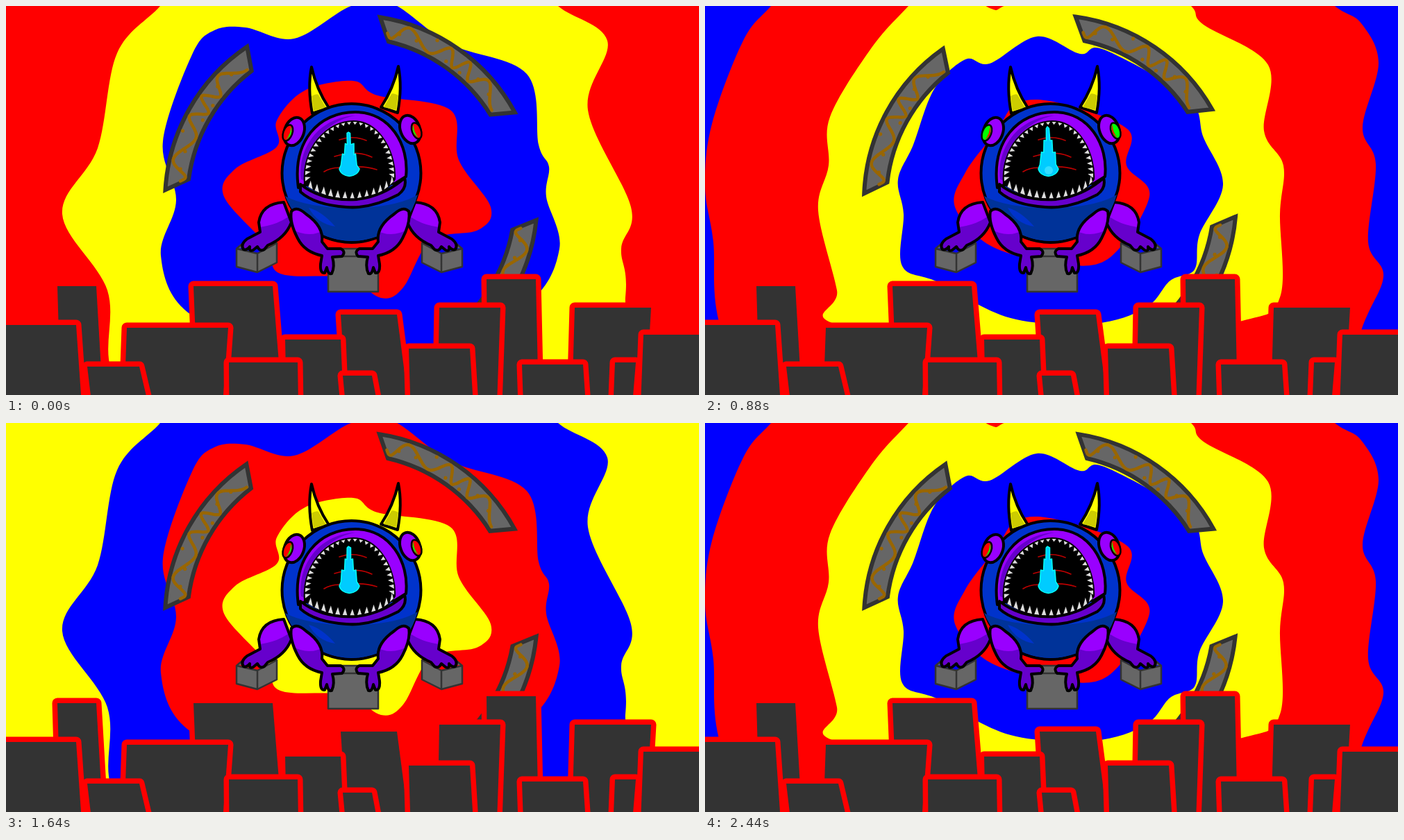
An HTML page that plays this animation: 998 px wide and 561 px high, repeating every 2.48 s.

```html
<!DOCTYPE html>
<html lang="en">
<head>
<meta charset="utf-8">
<title>City monster</title>
<style>
html, body { margin: 0; width: 100%; height: 100%; overflow: hidden; background: #000; }
svg { display: block; width: 998px; height: 561px; }
.ink { stroke: #000; stroke-width: 4; stroke-linejoin: round; }
.line { fill: none; stroke-linecap: round; stroke-linejoin: round; }
.block { fill: #666; stroke: #333; stroke-width: 2.5; stroke-linejoin: round; }
.rune { stroke: #0d0; stroke-width: 2; opacity: var(--rune); }
.house { fill: #333; stroke: #f00; stroke-width: 15; stroke-linejoin: round; paint-order: stroke; }
.lamp { fill: #ff0; fill-opacity: var(--lamp); }
</style>
</head>
<body>
<svg id="stage" viewBox="0 0 998 561">
  <rect id="sky" width="998" height="561"/>
  <g id="rings"></g>
  <g id="orbit"></g>

  <path class="block" d="M464 361L475 350H525L536 361V412H464ZH536"/>
  <g id="runes" class="line rune"></g>
  <g id="back">
    <path class="block" d="M332 350L346 338L390 342V370L362 384L332 376ZL362 357L390 342M362 357V384"/>
    <path class="line rune" d="M340 358V374M340 366L352 368M352 362V376M370 360V374M380 356V368"/>
  </g>
  <use href="#back" transform="matrix(-1 0 0 1 989 0)"/>

  <g class="ink">
    <g id="horn">
      <path fill="#ff0" d="M440 88Q434 118 441 155L465 147Q447 120 440 88Z"/>
      <path fill="#cc0" stroke="none" d="M440 130Q447 126 450 128L461 147L443 151Z"/>
    </g>
    <use href="#horn" transform="matrix(-1 0 0 1 1005 -1)"/>
    <circle cx="497.500" cy="241" r="100" fill="#03c"/>
    <path stroke="none" fill="#039" d="M402 274Q430 290 497 292Q565 290 593 272Q580 318 545 328Q497 350 450 327Q415 308 402 274Z"/>
    <path stroke="none" fill="#03c" d="M436 291Q455 296 474 318Q448 314 436 291Z"/>
    <g id="eye">
      <g transform="rotate(20 415 181)">
        <ellipse cx="415" cy="181" rx="14" ry="21" fill="#90f"/>
        <ellipse cx="407" cy="186" rx="6.500" ry="12" fill="var(--eye)" stroke-width="2.500"/>
        <path stroke="none" fill="var(--slit)" d="M408 176Q416 186 408 196Q412 186 408 176Z"/>
      </g>
    </g>
    <use href="#eye" transform="matrix(-1 0 0 1 997 -3)"/>
    <path fill="#90f" d="M421 262C412 195 450 153 503 153C553 153 581 200 576 246L560 256L430 258Z"/>
    <path stroke="none" fill="#60c" d="M425 250C420 200 455 160 503 158C460 166 428 204 430 252Z"/>
    <path stroke-width="2" d="M430 256C426 205 462 166 500 166C540 166 562 215 560 250Q540 278 500 280Q455 277 430 256Z"/>
  </g>
  <path class="line" stroke="#b00" stroke-width="1.600" d="M480 193Q500 186 519 194M473 217Q505 207 527 218M458 239Q470 231 490 234Q510 229 534 236"/>
  <g id="teeth" fill="#ddd"></g>
  <path class="ink" fill="#60c" d="M424 257Q455 282 505 279Q545 274 574 248Q578 262 565 272Q525 293 490 290Q445 287 424 268Z"/>
  <path id="flame" fill="#0cf" stroke="#0ff" stroke-width="1.500" stroke-linejoin="round"/>
  <circle id="glow" cx="495" cy="237" r="6" fill="#3df"/>
  <g id="front"></g>
  <use href="#front" transform="matrix(-1 0 0 1 991 0)"/>
  <g id="city"></g>
  <g id="bolts" fill="none" stroke="#0ff" stroke-width="12"></g>
</svg>

<script>
const TICK = 40, TICKS = 62, CYCLE = 20;
const $ = id => document.getElementById(id);

function add(parent, tag, attrs) {
  const el = document.createElementNS('http://www.w3.org/2000/svg', tag);
  for (const key in attrs) el.setAttribute(key, attrs[key]);
  return parent.appendChild(el);
}

// Catmull-Rom spline through points written as "x,y x,y ..."
function smooth(text, closed) {
  const p = text.split(' ').map(s => s.split(',').map(Number));
  const n = p.length;
  const at = i => closed ? p[(i + n) % n] : p[Math.max(0, Math.min(n - 1, i))];
  let d = 'M' + p[0];
  for (let i = 0; i < (closed ? n : n - 1); i++) {
    const [a, b, c, e] = [at(i - 1), at(i), at(i + 1), at(i + 2)];
    d += `C${b.map((v, k) => v + (c[k] - a[k]) / 6)} ${c.map((v, k) => v - (e[k] - b[k]) / 6)} ${c}`;
  }
  return d;
}

function random(seed) {
  return () => (seed = seed * 16807 % 2147483647) / 2147483647;
}

// Background: two alternating sets of blobs, outermost first
const ringSets = [
  [
    '222,0 160,68 132,205 81,300 146,410 150,520 200,620 860,620 892,420 886,350 900,290 838,150 866,50 795,0 740,-60 270,-60',
    '300,35 345,31 415,47 497,0 555,-4 640,55 750,98 767,200 782,232 778,275 797,350 750,430 600,500 400,500 262,442 223,360 245,280 226,195 268,70',
    '390,165 430,122 500,108 535,129 640,150 652,222 698,290 680,323 612,338 572,406 540,421 490,392 395,386 375,345 314,275 330,235 390,203'
  ], [
    '95,0 55,50 10,170 0,260 12,340 20,455 80,620 900,620 945,468 977,390 955,340 966,228 947,175 970,82 945,25 907,0 840,-60 150,-60',
    '293,0 240,60 180,160 178,230 163,295 190,410 192,460 500,505 770,455 828,420 828,300 833,230 805,180 811,85 718,27 700,0 640,-50 450,-6 410,3 340,-50',
    '478,44 540,69 575,63 695,132 718,190 746,258 712,330 705,380 670,396 635,435 560,458 440,450 335,398 284,375 286,300 278,250 300,200 330,120 375,77 410,83',
    '450,140 510,140 609,178 607,230 640,275 580,365 500,370 410,345 360,290 375,240 420,180'
  ]
];
const ringGroups = ringSets.map(set => {
  const g = add($('rings'), 'g', {});
  set.forEach(s => add(g, 'path', { d: smooth(s, true) }));
  return g;
});

// Orbiting stone arcs, each with a wavy vine and dots
const CX = 497, CY = 281, HUB = `${CX} ${CY}`;
function polar(deg, r) {
  const a = deg * Math.PI / 180;
  return `${CX + r * Math.sin(a)},${CY - r * Math.cos(a)}`;
}
const wave = a => 11 * Math.sin(a * 0.62 + 1.5 * Math.sin(a * 0.2));
const slab = `M${polar(0.8, 268)}A268 268 0 0 1 ${polar(53.4, 268)}L${polar(50, 236)}A236 236 0 0 0 ${polar(5, 236)}Z`;
const vine = Array.from({ length: 46 }, (_, i) => polar(4 + i, 252 + wave(4 + i))).join(' ');
for (const turn of [0, 87, 175, -95.6]) {
  const g = add($('orbit'), 'g', { transform: `rotate(${turn} ${HUB})` });
  add(g, 'path', { d: slab, fill: '#666', stroke: '#333', 'stroke-width': 6 });
  add(g, 'path', { d: smooth(vine), class: 'line', stroke: 'var(--vine)', 'stroke-width': 4.5 });
  for (let a = 8; a < 50; a += 6) {
    const [cx, cy] = polar(a, 252 - wave(a)).split(',');
    add(g, 'circle', { cx, cy, r: 2.6, fill: 'var(--vine)' });
  }
}

// Scribbles on the middle block
const scribble = random(11);
for (let i = 0; i < 13; i++) {
  const spot = () => `${468 + 64 * scribble()} ${364 + 45 * scribble()}`;
  add($('runes'), 'path', { d: `M${spot()}Q${spot()} ${spot()}` });
}

// Left legs; the right ones are mirrored
function leg(parent, name, d, shade) {
  const clip = add(parent, 'clipPath', { id: name });
  add(clip, 'path', { d });
  add(parent, 'path', { d, fill: '#90f' });
  add(parent, 'path', { d: shade, fill: '#60c', 'clip-path': `url(#${name})` });
  add(parent, 'path', { d, fill: 'none', class: 'ink' });
}
leg($('back'), 'hind', 'M400 283Q368 285 364 312L366 326L347 336Q337 344 342 351Q346 353 351 347Q350 355 356 352L362 347Q366 355 372 351L377 345Q402 335 411 312Z', 'M340 320Q385 322 412 300V360H335Z');
leg($('front'), 'fore', 'M411 296Q419 288 432 300Q458 318 455 340L463 350L482 350Q490 354 484 361L470 362Q474 376 469 386Q464 388 462 377L459 385Q452 386 453 372L455 360Q430 355 420 335Q408 312 411 296Z', 'M405 318Q435 338 460 322L500 345V395H440Z');

// Teeth along a curve
function teeth(d, count, size, tip) {
  const curve = add($('teeth'), 'path', { d, fill: 'none' });
  const total = curve.getTotalLength();
  for (let i = 0; i < count; i++) {
    const at = k => curve.getPointAtLength(total * (i + k) / count);
    const a = at(0.15), b = at(0.5), c = at(0.85);
    const [tx, ty] = tip(b), k = size(i / count) / Math.hypot(tx - b.x, ty - b.y);
    add($('teeth'), 'path', { d: `M${a.x} ${a.y}L${b.x + (tx - b.x) * k} ${b.y + (ty - b.y) * k}L${c.x} ${c.y}Z` });
  }
}
teeth('M431 254C427 206 462 167 500 167C540 167 561 215 559 249', 27, u => 4 + 9 * Math.abs(u - 0.5), () => [497, 225]);
teeth('M434 260Q460 277 500 279Q538 276 559 252', 13, () => 11, p => [p.x + 2, 200]);

// Houses, back to front: x, y, width, lean
const houses = [
  [74, 404, 56, 10], [270, 404, 114, 14], [692, 394, 71, 4], [482, 445, 81, 17], [624, 435, 88, -5], [819, 435, 110, -8],
  [-20, 460, 121, 8], [174, 464, 146, -8], [402, 481, 80, 4], [580, 494, 88, 5], [117, 520, 75, 13],
  [321, 514, 99, 1], [485, 533, 42, 8], [743, 517, 88, 4], [877, 514, 30, -5], [918, 474, 110, -8]
];
const rand = random(7);
for (const [x, y, w, lean] of houses) {
  const end = 575;
  add($('city'), 'path', { class: 'house', d: `M${x} ${y}H${x + w}L${x + w + lean} ${end}H${x + lean / 2}Z` });
  for (let row = y + 16; row < end; row += 17)
    for (let col = x + 14; col < x + w - 6; col += 17) {
      if (rand() < 0.12) continue;
      const cx = col + lean * (row - y) / (end - y) + rand() * 4 - 2, cy = row + rand() * 3 - 1.5;
      add($('city'), 'ellipse', { class: 'lamp', cx, cy, rx: 5.5 + rand(), ry: 3.5, transform: `rotate(${-10 * rand()} ${cx} ${cy})` });
    }
}

const bolts = [
  '628,0 615,35 616,58 630,72', '626,102 628,130 631,165 624,215 613,245 619,275 614,310 621,329', '624,372 607,400 612,418 627,424',
  '840,0 890,30 888,52 862,76 868,108 836,155 838,174 852,180', '843,207 830,218 842,245 814,280 843,315 820,360 855,398 847,424'
];
bolts.forEach(s => add($('bolts'), 'path', { d: smooth(s) }));

// Jagged drop: spikes climb one side to the tip, then descend the other
function flame(beat) {
  const r = random(31 + beat * 977), tip = 182 - 4 * beat, steps = 6;
  const side = dir => Array.from({ length: steps }, (_, i) => {
    const u = (i + 1) / (steps + 1), jag = i % 2 ? 2 : -1;
    return `${494 + dir * (14 * (1 - u) ** 1.2 + jag * r())},${234 + (tip - 234) * u - jag * 3}`;
  });
  return `M480 235L${side(-1).join('L')}L493 ${tip}L${side(1).reverse().join('L')}L509 235A15 14 0 0 1 480 235Z`;
}
const flames = [0, 1, 2, 3].map(flame);

// Glow levels, one per fifth of the cycle
const lamps = [0, 1, 0.8, 0.25, 0.25];
const runes = [0, 0.5, 0.9, 0.4, 0];
const vines = ['#960', '#990', '#cc2', '#a80', '#c90'];

const hues = ['#f00', '#00f', '#ff0'];
const ease = x => x < 0.5 ? (2 * x) ** 2.3 / 2 : 1 - (2 - 2 * x) ** 2.3 / 2;

function draw(tick) {
  const t = tick % CYCLE, step = t >> 2, beat = tick % 4;
  const state = (Math.min(tick, 59) >> 1) % 6;
  const odd = state % 2, inner = 3 - Math.ceil(state / 2);
  ringGroups.forEach((g, i) => g.style.display = i === odd ? '' : 'none');
  const rings = [...ringGroups[odd].children];
  rings.forEach((el, i) => el.setAttribute('fill', hues[(inner + rings.length - 1 - i) % 3]));
  $('sky').setAttribute('fill', hues[(inner + rings.length) % 3]);

  $('orbit').setAttribute('transform', `rotate(${8.2 - 90 * ease(t / CYCLE)} ${HUB})`);
  $('bolts').style.display = t === 14 || t === 15 ? '' : 'none';
  $('flame').setAttribute('d', flames[beat]);
  $('glow').style.display = beat === 2 ? '' : 'none';

  const [eye, slit] = beat > 1 ? ['#0f0', '#f00'] : ['#f00', '#0f0'];
  const vars = { eye, slit, lamp: lamps[step], rune: runes[step], vine: vines[step] };
  for (const name in vars) $('stage').style.setProperty('--' + name, vars[name]);
}

let last = -1;
function loop() {
  const tick = Math.floor(performance.now() / TICK) % TICKS;
  if (tick !== last) draw(last = tick);
  requestAnimationFrame(loop);
}
draw(0);
loop();
</script>
</body>
</html>
```
